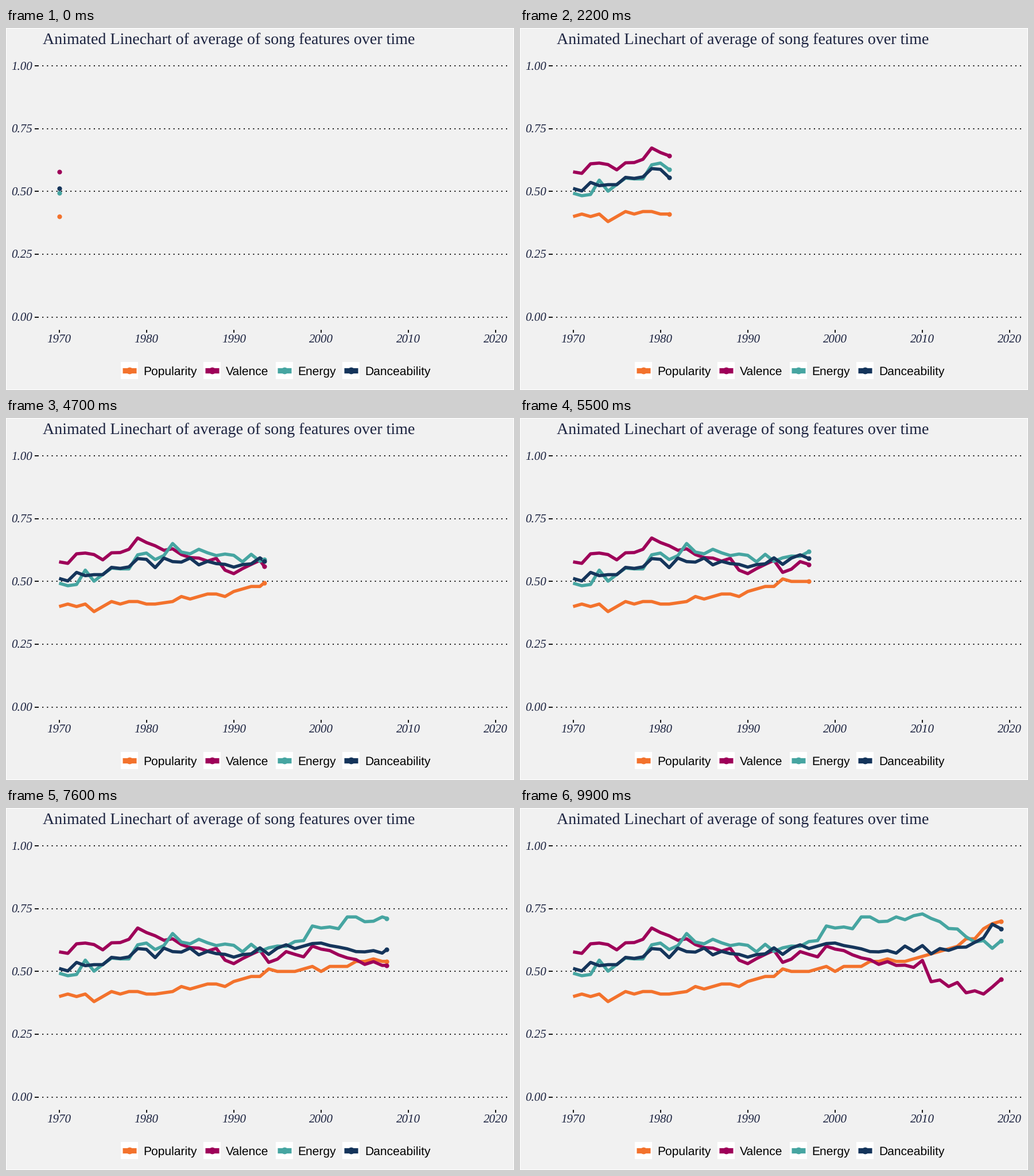
Recreate the animation shown at these times as a matplotlib script. Size 885 by 632 pixels, loop 10000 ms.

```python
import numpy as np
import matplotlib.pyplot as plt
from matplotlib.animation import FuncAnimation
from matplotlib.patches import Rectangle

W, H, DPI = 885, 632, 100
PT = 72 / DPI  # points per pixel
FRAMES, INTERVAL = 100, 100

BACK, INK, RULE = "#f1f1f1", "#1c2340", "#1a1a1a"
SERIF, SANS = "Liberation Serif", "Liberation Sans"

# Yearly averages from 1970 to 2019, in thousandths
popularity = [
    400, 410, 400, 410, 380, 400, 420, 410, 420, 420,
    410, 410, 415, 420, 440, 430, 440, 450, 450, 440,
    460, 470, 480, 480, 510, 500, 500, 500, 510, 520,
    500, 520, 520, 520, 540, 540, 550, 540, 540, 550,
    560, 570, 580, 590, 600, 630, 630, 670, 690, 700]
valence = [
    578, 572, 610, 613, 607, 586, 614, 615, 628, 673,
    655, 642, 624, 630, 607, 595, 593, 581, 592, 545,
    531, 551, 568, 584, 536, 549, 579, 568, 558, 601,
    589, 583, 566, 554, 547, 528, 539, 524, 525, 516,
    544, 459, 466, 440, 456, 415, 423, 410, 438, 469]
energy = [
    493, 483, 488, 545, 501, 528, 553, 550, 550, 606,
    613, 587, 603, 651, 617, 610, 628, 614, 603, 609,
    604, 578, 608, 580, 594, 601, 600, 619, 623, 681,
    673, 677, 670, 717, 717, 698, 700, 717, 706, 722,
    729, 711, 698, 671, 669, 638, 617, 623, 592, 622]
danceability = [
    512, 502, 536, 523, 527, 527, 556, 552, 558, 591,
    588, 555, 593, 579, 577, 593, 566, 580, 571, 568,
    557, 567, 570, 594, 568, 593, 606, 591, 601, 611,
    613, 603, 597, 590, 579, 578, 583, 573, 601, 581,
    603, 570, 591, 584, 596, 597, 616, 634, 688, 670]

# name, colour, values, left edge of the legend key
SERIES = [
    ("Popularity", "#f3722c", popularity, 200.2),
    ("Valence", "#9e0059", valence, 343.7),
    ("Energy", "#46a5a1", energy, 469.7),
    ("Danceability", "#15355b", danceability, 586.0),
]
YEARS = np.arange(1970, 2020)
# Every year lands on a whole frame; positions in between are linear
KEYS = np.round((FRAMES - 1) * (YEARS - YEARS[0]) / (YEARS[-1] - YEARS[0]))


def px(year):
    return 92.5 + (year - 1970) * 15.214


def py(value):
    return 504.6 - value * 438.5


plt.rcParams["text.hinting"] = "none"
fig = plt.figure(figsize=(W / DPI, H / DPI), dpi=DPI, facecolor=BACK)
ax = fig.add_axes([0, 0, 1, 1])
ax.set_xlim(0, W)
ax.set_ylim(H, 0)
ax.axis("off")


def line(xs, ys, color, width, **kw):
    kw.setdefault("solid_capstyle", "butt")
    return ax.plot(xs, ys, color=color, lw=width * PT, **kw)[0]


def dot(x, y, color, radius, **kw):
    return ax.plot([x], [y], "o", color=color, ms=2 * radius * PT, mew=0, **kw)[0]


def text(x, y, s, size, font=SERIF, color=INK, **kw):
    ax.text(x, y, s, fontsize=size * PT, family=font, color=color,
            va="baseline", **kw)


# White frame around the plot
ax.add_patch(Rectangle((0, 0), W, H, fill=False, ec="white", lw=2 * PT))

text(63.6, 28.3, "Animated Linechart of average of song features over time", 28)

LEFT, RIGHT, BOTTOM, TICK, RULE_W = 55.2, 875.4, 526.6, 5.25, 2.04
for v in (0, 0.25, 0.5, 0.75, 1):
    y = py(v)
    line([LEFT, RIGHT], [y, y], RULE, RULE_W,
         linestyle=(0, (1, 3)), dash_capstyle="butt", zorder=1)
    line([LEFT - TICK, LEFT], [y, y], RULE, RULE_W)
    text(46.4, y + 7.2, f"{v:.2f}", 21, style="italic", ha="right")
for year in range(1970, 2021, 10):
    x = px(year)
    line([x, x], [BOTTOM, BOTTOM + TICK], RULE, RULE_W)
    text(x, 549.4, str(year), 21, style="italic", ha="center")

KEY, KEY_Y = 30.2, 598
curves, heads = [], []
for i, (name, color, values, left) in enumerate(SERIES):
    ax.add_patch(Rectangle((left, KEY_Y - KEY / 2), KEY, KEY, fc="white", lw=0))
    line([left + 0.1 * KEY, left + 0.9 * KEY], [KEY_Y, KEY_Y], color, 9.3)
    dot(left + KEY / 2, KEY_Y, color, 5.9)
    text(left + KEY + 8.6, KEY_Y + 7.7, name, 21, SANS, "black")
    curves.append(line([], [], color, 5.6, solid_joinstyle="round", zorder=3 + i))
    heads.append(dot(0, 0, color, 4.1, zorder=10 + i))


def update(frame):
    now = np.interp(frame, KEYS, YEARS)
    xs = np.append(YEARS[YEARS < now], now)
    for (_, _, values, _), curve, head in zip(SERIES, curves, heads):
        ys = py(np.interp(xs, YEARS, values) / 1000)
        curve.set_data(px(xs), ys)
        head.set_data([px(now)], [ys[-1]])
    return curves + heads


anim = FuncAnimation(fig, update, frames=FRAMES, interval=INTERVAL,
                     repeat=True, repeat_delay=0)
plt.show()
```
